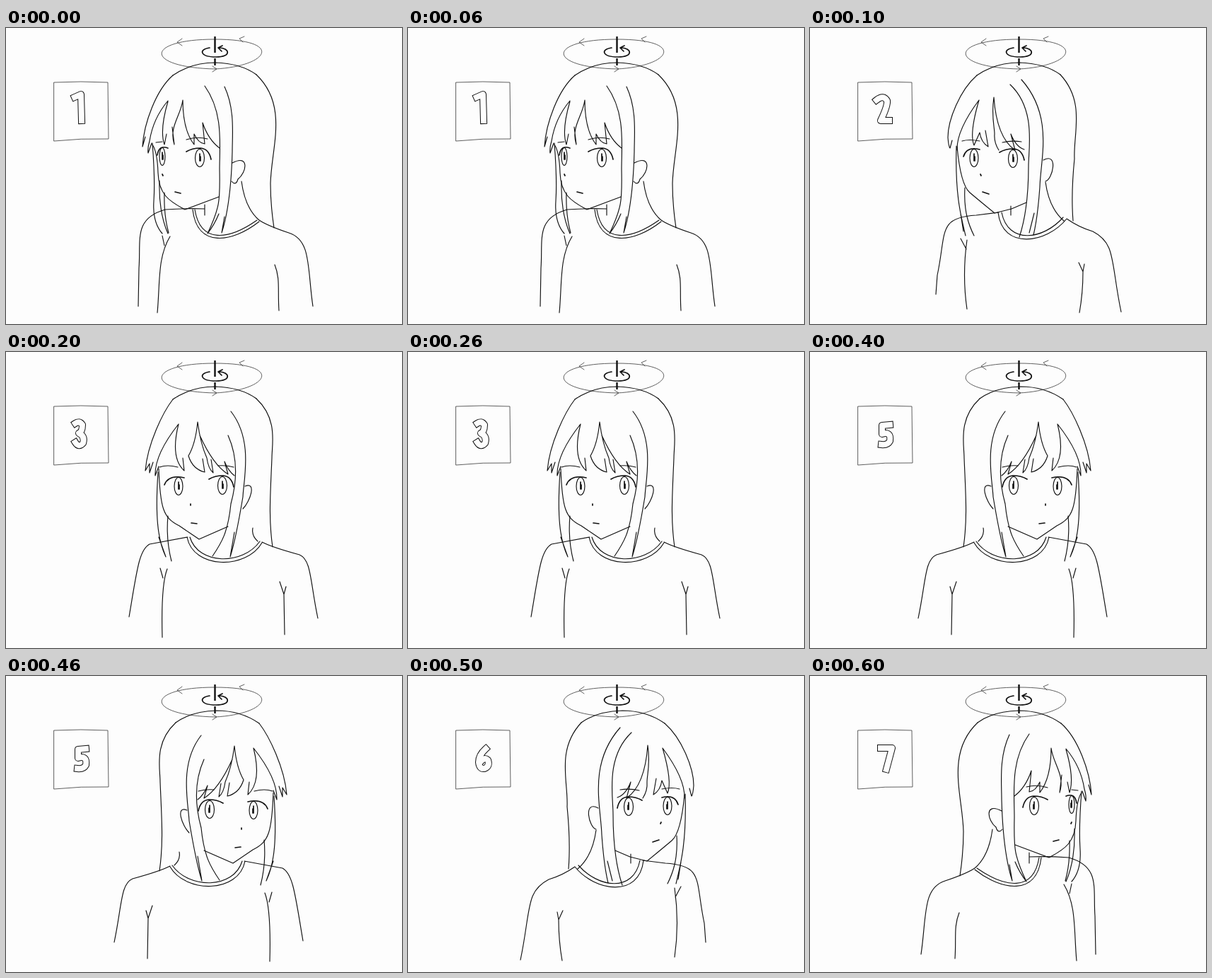
Write an HTML page that moves like this. It is 560 by 419 pixels and loops after 700 ms.

```html
<!DOCTYPE html>
<html lang="en">
<head>
<meta charset="utf-8">
<title>Head turn</title>
<style>
  html, body { margin: 0; width: 100%; height: 100%; overflow: hidden; background: #fdfdfd; }
  svg { display: block; width: 100vw; height: 100vh; }
  path, ellipse { fill: none; stroke: #111; stroke-width: 1.15; stroke-linecap: round; stroke-linejoin: round; }
  .thin { stroke: #444; stroke-width: .85; }
  .bold { stroke-width: 1.7; }
  .axis { stroke-width: 2.4; stroke-linecap: butt; }
  .digit { stroke-width: 10; stroke-linecap: square; }
  .digit + .digit { stroke: #fdfdfd; stroke-width: 8; }
</style>
</head>
<body>
<svg viewBox="0 0 560 419">
  <path class="thin" d="M296 58C195 56 195 16 295 16S372 54 296 58M249 15L242 20 249 25M337 12L330 15 335 20M292 54L298 58 292 62"/>
  <path class="bold" d="M288 28C272 30 274 41 297 41S316 28 301 28M306 25L300 28 305 33"/>
  <path class="axis" d="M295.500 12V35M295.500 43V53"/>
  <path class="thin" d="M68 77Q106 75 144 77L145 157Q106 156 68 160Z"/>
  <path class="digit"/><path class="digit"/>

  <g id="figure">
    <path d="M236 67Q262 49 296 49Q332 50 354 66"/>

    <g id="side">
      <path class="hair" d="M236 67C212 88 195 135 193 168L197 154M354 66C400 110 375 170 374 220Q374 250 379 283"/>
      <path class="bangs" d="M229 103Q208 128 203 160Q200 170 201 177L206 163M229 104Q217 145 224 165L227 150M250 102C247 125 230 140 238 165L235 140M250 102C250 130 256 152 266 165V150Q272 163 281 164L278 134Q286 158 302 170"/>
      <path class="locks" d="M281 82C308 120 302 165 302 200C303 245 302 255 285 291Q295 278 301 263M309 83C324 115 320 150 320 175Q318 250 305 290L309 267M207 163Q211 215 209 245T221 291M217 216C216 250 222 275 229 291M224 233Q223 265 230 290"/>
      <path class="face" d="M207 165Q214 175 215 205C216 235 230 245 253 257L301 239M320 191C345 178 340 205 328 214Q325 224 319 217M212 162L221 161M255 158Q270 153 285 157"/>
      <path class="body" d="M225 257Q255 255 281 256M281 250V265M333 217Q338 255 358 272M264 257C270 312 320 304 358 274M267 257C275 306 315 300 355 272M225 257C180 270 191 300 188 340L187 394M358 272Q370 280 400 290C432 300 426 340 434 394M232 295C214 325 218 360 214 403M221 294L224 308M380 335C388 355 384 370 386 400"/>
      <path class="bold" d="M221 207L222 209M239 232L247 234"/>
    </g>

    <g id="turned">
      <path class="hair" d="M236 67C212 88 195 130 195 155Q196 168 198 170L201 159M354 66C390 105 372 150 374 185Q369 235 372 273"/>
      <path class="bangs" d="M239 102Q207 145 208 173M239 102Q225 150 232 166L240 148Q242 162 252 168L248 145M260 98C256 125 261 140 261 150Q260 162 267 173M260 98Q264 155 290 173L284 150Q291 168 303 172"/>
      <path class="locks" d="M283 80C320 115 309 170 309 195C309 245 303 275 296 296M299 73C345 125 326 185 325 225Q322 268 316 293M317 262L310 290M207 167C205 235 213 265 220 294M219 226C217 260 225 280 232 294M213 263L217 288"/>
      <path class="face" d="M208 168Q213 222 226 233T261 262L285 256 306 247M330 187C352 175 343 215 333 217M215 160Q225 157 240 160M272 162Q285 159 299 161"/>
      <path class="body" d="M284 252V265M333 218Q338 255 359 273M266 261C272 315 335 305 363 270M271 261C280 307 330 300 358 268M267 261L235 265C180 268 193 290 180 350L178 377M363 270Q380 282 400 288C433 305 425 330 440 402M213 298L221 313M222 300Q215 350 222 398M380 332L386 345 388 334M386 345Q386 375 381 403"/>
      <path class="bold" d="M241 207L242 209M244 232L253 235"/>
    </g>

    <g id="slight">
      <path class="hair" d="M236 67C222 85 200 130 197 168L203 158V171L208 156M354 66C385 95 376 130 376 150C374 200 371 235 377 276"/>
      <path class="bangs" d="M244 102Q210 145 211 175L216 162M244 102Q232 150 252 168L250 150M271 99Q268 130 258 147Q264 166 281 170L278 151M271 99Q275 130 284 150Q286 165 293 171L290 152M274 118Q293 160 314 173L309 155Q314 168 323 175"/>
      <path class="locks" d="M318 84C350 125 336 180 335 205C330 235 325 265 317 290L323 255M314 118Q333 160 318 215C314 255 305 270 292 289M215 170C211 230 214 265 226 290L216 262M229 232Q226 265 234 296"/>
      <path class="face" d="M216 165C218 220 222 235 245 246L273 265 314 247M338 190C355 183 345 212 335 222M217 163Q228 159 243 163M300 161Q311 160 322 163"/>
      <path class="body" d="M349 249Q347 260 356 268M256 262C265 308 340 308 362 270M260 262C272 302 335 302 359 268M257 262L203 272C188 280 185 310 174 375M362 269Q375 276 415 287C432 294 430 325 441 377M218 306L222 320M228 307Q219 330 221 404M387 325L393 343 396 332M393 343L394 400"/>
      <path class="bold" d="M261 215V217M262 242L270 243"/>
    </g>

    <g id="front">
      <path class="hair" d="M236 67C215 105 218 150 214 185Q209 240 216 292Q222 280 218 261L238 294C228 240 242 190 240 122M354 66C393 100 376 150 373 180C370 230 360 250 355 289"/>
      <path class="bangs" d="M272 104Q240 160 241 178Q249 170 254 157M272 104Q272 140 266 164L268 152Q272 168 281 176L277 152Q283 170 292 177L290 153Q300 170 312 177L305 158M300 111Q316 155 332 174L326 152Q338 168 350 176"/>
      <path class="locks" d="M352 107C354 170 361 230 346 292L357 267"/>
      <path class="face" d="M236 195Q238 230 252 243T302 274Q360 250 356 213M240 163Q258 160 277 164M322 162L345 164M265 186Q270 180 275 187M316 187Q320 181 329 181M293 250Q296 246 299 250Q296 253 293 250"/>
      <path class="body" d="M247 265L258 261M341 254L351 263M247 265C255 303 340 303 354 272M252 264C262 297 330 300 349 274M247 265Q218 273 188 281C180 295 178 320 176 359M361 264Q395 270 418 284Q424 310 432 351M213 309L219 320 217 312M225 310L219 320 221 403M403 300L393 330 383 317M393 330L395 398"/>
      <path class="bold" d="M243 199Q255 207 271 204Q258 209 246 201M313 201Q333 208 348 196Q333 209 316 203M295 229V230"/>
    </g>
  </g>
</svg>
<script>
const HOLD = 100;

// The later half of the turn reuses the poses, flipped: x becomes mirror - x.
// Digits are centre lines that get an outline from two strokes of different width.
const steps = [
  { pose: "side", digit: "M97 98L106 94 107 131" },
  { pose: "turned", digit: "M94 102Q104 94 109 103Q110 110 100 131H112" },
  { pose: "slight", digit: "M98 101Q104 97 108 103Q108 113 103 115Q112 119 109 129Q103 136 98 128" },
  { pose: "front", digit: "M95 102L96 116H113M106 102L105 131" },
  { pose: "slight", mirror: 594, digit: "M113 103L102 104V116Q115 112 113 126Q110 132 101 131" },
  { pose: "turned", mirror: 599, digit: "M110 103Q100 112 100 122Q101 132 108 131Q116 128 113 119Q109 115 104 120" },
  { pose: "side", mirror: 591, digit: "M100 102H116L108 132" }
];

const find = id => document.getElementById(id);

function add(parent, tag, attributes) {
  const node = document.createElementNS("http://www.w3.org/2000/svg", tag);
  for (const [key, value] of Object.entries(attributes)) node.setAttribute(key, value);
  parent.append(node);
}

function addEye(pose, cx, cy, rx, lash) {
  add(pose, "ellipse", { cx, cy, rx, ry: 12.5 });
  add(pose, "path", { class: "bold", d: `M${cx} ${cy}m0 -6v10m1 -6v6` });
  add(pose, "path", { class: "bold", d: `M${cx} ${cy}${lash}` });
}

// reach is how far the lash of the far eye runs past its iris
function addEyes(id, farX, farY, farWidth, reach, nearX, nearY) {
  addEye(find(id), farX, farY, farWidth, `m${-reach} -2q${reach * 0.3} -15 ${reach + 8} -10`);
  addEye(find(id), nearX, nearY, 6.5, "m-19 -9q8 -5 20 -5q12 1 15 16");
}
addEyes("side", 221, 182, 4, 7, 274, 184);
addEyes("turned", 232, 184, 6, 15, 287, 185);
addEyes("slight", 244, 190, 6, 20, 306, 189);

let shown;
function render(time) {
  const step = steps[Math.floor(time / HOLD) % steps.length];
  if (step === shown) return;
  shown = step;
  for (const group of document.querySelectorAll("#figure > g"))
    group.style.display = group.id === step.pose ? "" : "none";
  find("figure").setAttribute("transform", step.mirror ? `translate(${step.mirror} 0) scale(-1 1)` : "");
  for (const path of document.querySelectorAll(".digit")) path.setAttribute("d", step.digit);
}

const start = performance.now();
function tick() {
  render(performance.now() - start);
  requestAnimationFrame(tick);
}
tick();
</script>
</body>
</html>
```
